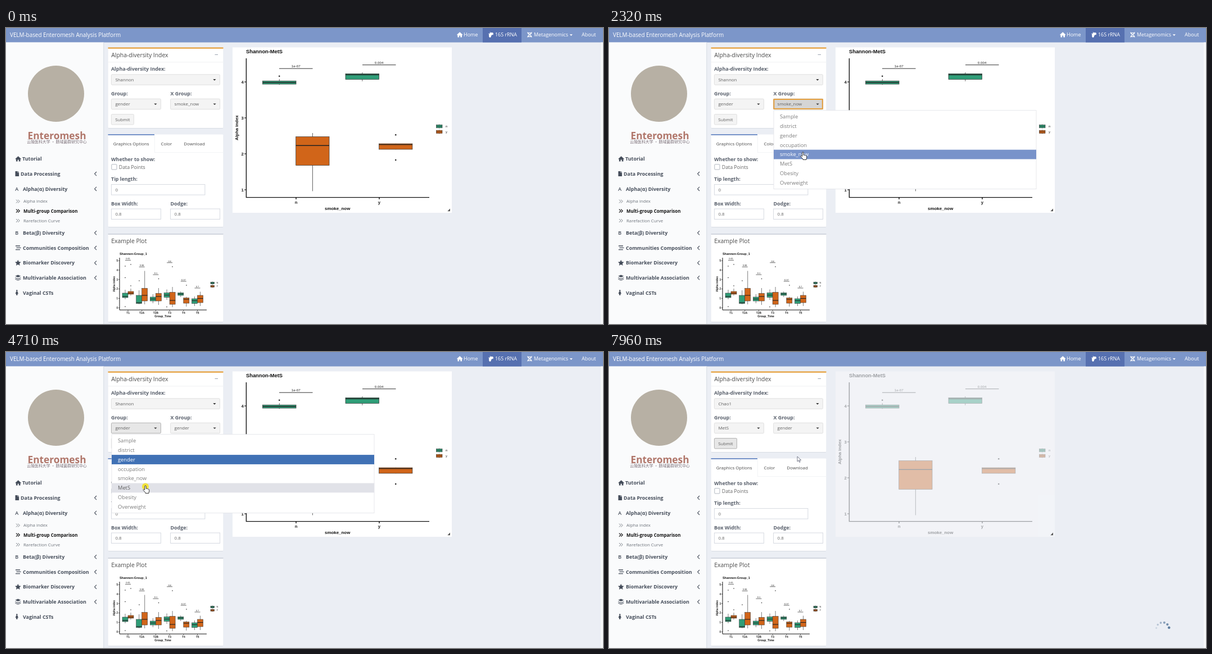
Recreate the animation shown at these times as an HTML page. Size 1062 by 527 pixels, loop 8000 ms.

```html
<!DOCTYPE html>
<html lang="en">
<head>
<meta charset="utf-8">
<title>Alpha diversity</title>
<style>
html, body { margin: 0; width: 100%; height: 100%; overflow: hidden; background: #ebeef4; }
svg { display: block; width: 1062px; height: 527px; }
text { font-family: "Open Sans", sans-serif; white-space: pre; }
.plot text { font-family: "Liberation Sans", Arial, sans-serif; }
.cjk { font-family: "Noto Sans CJK SC", "Noto Sans CJK", sans-serif; }
</style>
</head>
<body>
<svg id="stage" viewBox="0 0 1062 527" xmlns="http://www.w3.org/2000/svg"></svg>
<script>
const LOOP = 8000;
const GREEN = '#2f9d77', ORANGE = '#d16519', INK = '#454d5a', SOFT = '#666';
const stage = document.getElementById('stage');
const out = [];
const put = s => out.push(s);

const rect = (x, y, w, h, fill, extra = '') =>
  `<rect x="${x}" y="${y}" width="${w}" height="${h}" fill="${fill}" ${extra}/>`;
const path = (d, fill, extra = '') => `<path d="${d}" fill="${fill}" ${extra}/>`;
const line = (d, color, w = 1) => path(d, 'none', `stroke="${color}" stroke-width="${w}"`);
const dot = (x, y, r, fill = '#222') => `<circle cx="${x}" cy="${y}" r="${r}" fill="${fill}"/>`;
const text = (x, y, s, size, fill = SOFT, extra = '') =>
  `<text x="${x}" y="${y}" font-size="${size}" fill="${fill}" ${extra}>${s}</text>`;
const BOLD = 'font-weight="700"', MID = 'text-anchor="middle"', END = 'text-anchor="end"';
const at = (x, y, d, fill, extra = '') => path(d, fill, `transform="translate(${x} ${y})" ${extra}`);

const HOME = 'M0 5L5.2 .3 10.4 5l-.7.8L9 5.2V9.5H6.3V6.4H4.1v3.1H1.4V5.2l-.7.6z';
const CARET = 'M-2.6-1.2h5.2L0 1.5z';

// Top bar
function navbar() {
  put(rect(0, 0, 1062, 25.6, '#7c96c9'));
  put(rect(848, 0, 69, 25.6, '#5670b0'));
  put(text(7, 15.8, 'VELM-based Enteromesh Analysis Platform', 9.9, '#fff'));
  put(at(802, 7, HOME, '#fff'));
  put(text(814, 15.2, 'Home', 9, '#fff'));
  put(at(858, 7.5, 'M1 6Q1 1 6 .6q3 0 3 2.2 0 1.6-2 2Q5 5 5 7.2 4.6 9.6 2.6 9.4 1 9 1 6z', '#fff'));
  put(line('M858 10l2 1M861 7l1 2M867 12l-2-1', '#fff', .8));
  put(text(870, 15.2, '16S rRNA', 8.95, '#fff'));
  put(line('M928 7.5c0 5 7 4 7 9M935 7.5c0 5-7 4-7 9M928 8.8h7M928 15.4h7', '#fff', 1.3));
  put(text(939, 15.2, 'Metagenomics', 8.95, '#fff'));
  put(at(1005.3, 12.5, CARET, '#fff'));
  put(text(1024, 15.2, 'About', 9, '#fff'));
}

function sidebar() {
  put(rect(172, 25.6, 2.5, 502, '#dfe3ea'));
  put(rect(0, 25.6, 173, 502, '#fafbfc'));
  put(rect(1058, 25.6, 4, 502, '#f6f7f9'));
  put(dot(89, 117, 50, '#b7b0a4'));
  put(text(90.5, 198, 'Enteromesh', 17.3, '#b0766a', BOLD + ' ' + MID));
  put(text(90.5, 204.8, '云陵医科大学 · 肠域菌群研究中心', 6.9, '#7b6f78', MID + ' class="cjk"'));

  const items = [
    [29, 236.2, 'Tutorial', 0], [26, 262.8, 'Data Processing', 1], [30, 289.6, 'Alpha(α) Diversity', 1],
    [30, 368, 'Beta(β) Diversity', 1], [30, 394.8, 'Communities Composition', 1],
    [30, 421.4, 'Biomarker Discovery', 1], [30, 448, 'Multivariable Association', 1], [30, 474.6, 'Vaginal CSTs', 0]
  ];
  for (const [x, y, s, chevron] of items) {
    put(text(x, y, s, 8.9, INK, BOLD));
    if (chevron) put(line(`M161 ${y - 6.8}l-3.4 3.6 3.4 3.6`, INK, 1.1));
  }
  put(at(16.5, 228, HOME, INK));
  put(at(16.5, 255, 'M0 0h4v2.6h2.6V9H0z M4.6 0l2 2h-2z', INK));
  put(text(16.3, 289.6, 'A', 9, INK, 'font-weight="600"'));
  put(text(16.3, 368, 'B', 9, INK, 'font-weight="600"'));
  put(line('M17 388h8M18.5 391.3h8M17 394.6h8', INK, 1.3));
  put(at(21.3, 418, 'M0-5.2l1.6 3.4 3.7.5-2.7 2.5.7 3.7L0 3.1l-3.3 1.8.7-3.7-2.7-2.5 3.7-.5z', INK));
  put(at(21.3, 444.5, 'M0-5l5 2.2L0-.6-5-2.8zM-5-.4L0 1.8 5-.4v1L0 3-5 .6zM-5 2L0 4.2 5 2v1L0 5.3-5 3z', INK));
  put(dot(19.3, 467.6, 1.3, INK));
  put(at(19.3, 469.2, 'M-1.3 0h2.6l1.3 4H1.2v2.5h-2.4V4h-1.4z', INK));

  const subs = [[311.4, 'Alpha index'], [328.5, 'Multi-group Comparison'], [345.8, 'Rarefaction Curve']];
  subs.forEach(([y, s], i) => {
    const on = i === 1, c = on ? '#111' : '#6d737b';
    put(line(`M18 ${y - 5.8}l3 3-3 3M21.3 ${y - 5.8}l3 3-3 3`, c, on ? 1.2 : .9));
    put(text(31, y, s, on ? 7.95 : 7.85, c, on ? BOLD : ''));
  });
}

function panel(y, h) {
  put(rect(181.5, y + 1, 205, h, '#d8dce3', 'rx="2"'));
  put(rect(181.5, y, 205, h, '#fff', 'rx="1.5"'));
}
const label = (x, y, s) => put(text(x, y, s, 8.9, '#59606c', BOLD));
function input(x, y, w, value) {
  put(rect(x, y, w, 18.5, '#fff', 'stroke="#d2d6de" stroke-width=".9"'));
  put(text(x + 7, y + 12.4, value, 8, SOFT));
}
function select(id, x, y, w) {
  put(`<g id="${id}">` +
    rect(x, y, w, 18.5, '#f4f4f4', 'class="face" rx="1.5" stroke="#ddd" stroke-width=".9"') +
    rect(x + .8, y + .8, w - 1.6, 16.9, 'none', 'class="ring" stroke="#e6a140" stroke-width="2"') +
    text(x + 7, y + 12, '', 7.95, '#5f5f5f') + at(x + w - 9.5, y + 9.4, CARET, '#333') + '</g>');
}

function forms() {
  panel(35, 143);
  put(rect(181.5, 34.6, 205, 2.1, '#e49a2f'));
  put(line('M182 60.8H386', '#f0f1f3'));
  put(text(187.3, 51.6, 'Alpha-diversity Index', 10.4, '#4a4a4a'));
  put(line('M371.5 47.4h5.5', '#8c94a3', .9));
  label(187, 76.4, 'Alpha-diversity Index:');
  label(187, 120, 'Group:');
  label(292.5, 120, 'X Group:');
  select('index', 187.4, 82.8, 193);
  select('group', 187.4, 126.2, 88);
  select('xgroup', 292.6, 126.2, 88);
  put('<g id="submit">' + rect(187.4, 153.6, 40, 18.4, '#f4f4f4', 'class="face" rx="1.5" stroke="#ddd" stroke-width=".9"') +
    text(207.4, 165.6, 'Submit', 7.95, '#5f5f5f', MID) + '</g>');

  panel(189.5, 164.5);
  put(line('M264 221.6H386.5', '#f2f3f5'));
  put(rect(181.5, 189, 82.5, 2, '#7592c9'));
  put(line('M264.3 191V221.6', '#f2f3f5'));
  put(text(190.7, 209.4, 'Graphics Options', 7.95, '#4a4a4a'));
  put(text(275.5, 209.4, 'Color', 7.95, '#4a4a4a'));
  put(text(316.3, 209.4, 'Download', 7.95, '#4a4a4a'));
  label(187, 237.2, 'Whether to show:');
  put(rect(187.8, 242.8, 9.2, 9.2, '#fff', 'rx="1" stroke="#aab0ba" stroke-width=".9"'));
  put(text(200.8, 250.6, 'Data Points', 8.75));
  label(187, 272.2, 'Tip length:');
  input(187.4, 278.6, 166.5, '0');
  label(187, 315.6, 'Box Width:');
  label(292.5, 315.6, 'Dodge:');
  input(187.4, 322, 88, '0.8');
  input(292.6, 322, 88, '0.8');

  panel(366.5, 156.5);
  put(rect(181.5, 366, 205, 2, '#d2d6de'));
  put(text(187.3, 383, 'Example Plot', 10.4, '#4a4a4a'));
}

// Box from whisker top, upper quartile, median, lower quartile, whisker bottom
function box(x, w, [hi, q3, med, q1, lo], fill, k) {
  const m = x + w / 2;
  return line(`M${m} ${hi}V${lo}`, '#333', .8 * k) +
    rect(x, q3, w, q1 - q3, fill, `stroke="#333" stroke-width="${.7 * k}"`) +
    line(`M${x} ${med}h${w}`, '#222', 1.4 * k);
}
function legend(x, y, w, h, gap, names, size) {
  return names.map((n, i) => {
    const t = y + i * gap;
    return line(`M${x + w / 2} ${t - 1}v${h + 2}`, '#333', .6) +
      rect(x, t, w, h, i ? ORANGE : GREEN, 'stroke="#333" stroke-width=".6"') +
      line(`M${x} ${t + h / 2}h${w}`, '#222', .8) + text(x + w + size, t + h / 2 + size * .35, n, size, '#222');
  }).join('');
}
const upright = (x, y, s, size) =>
  text(0, 0, s, size, '#111', `${BOLD} ${MID} transform="translate(${x} ${y}) rotate(-90)"`);

function mainPlot() {
  put('<g id="plot" class="plot">' + rect(403, 34.5, 390, 294.5, '#fff'));
  put(text(427, 45, 'Shannon-MetS', 9.3, '#111', BOLD));
  for (let v = 1; v < 5; v++) {
    const y = 352 - 64 * v;
    put(line(`M424 ${y}h3.5`, '#111', 1.1) + text(422.8, y + 2.8, v, 7.7, '#222', BOLD + ' ' + END));
  }
  put(line('M427.4 54V301.6H753M516 301.6v3.4M664 301.6v3.4', '#111', 1.4));
  put(text(516, 312.6, 'n', 7.7, '#222', BOLD + ' ' + MID) + text(664, 312.6, 'y', 7.7, '#222', BOLD + ' ' + MID));
  put(text(589.7, 323.6, 'smoke_now', 7.9, '#111', BOLD + ' ' + MID) + upright(412.8, 177.7, 'Alpha index', 7.9));
  put(line('M486 72.2h59.5M634 65.7h59.5', '#333', 1));
  put(text(515.7, 70, '1e-07', 6.2, '#222', MID) + text(663.6, 63.5, '0.004', 6.2, '#222', MID));
  put(box(456.5, 59.5, [91, 94.2, 97, 100, 101.2], GREEN, 1) + box(604, 59.5, [79, 81.5, 83.2, 91.4, 94.8], GREEN, 1));
  put(box(515.7, 59.3, [187, 193.6, 209.2, 244.5, 290.5], ORANGE, 1) + box(663.6, 59.3, [205.8, 206, 207.6, 216, 216.2], ORANGE, 1));
  put(dot(486.2, 85.8, 1.3) + dot(693.2, 190.3, 1.3) + dot(693.2, 235, 1.3));
  put(legend(765.5, 172.4, 10.5, 5.4, 9.8, ['n', 'y'], 6));
  put('</g>' + path('M790 321.5v4.7h-4.7z', '#555'));
}

function examplePlot() {
  const groups = [
    ['T1', 413.6, '0.65', [466, 472, 478, 480, 483], [464, 469, 472, 474, 476.5]],
    ['T2A', 425.4, '0.88', [467, 476, 489, 490.5, 492], [432.5, 463.5, 476, 486, 492]],
    ['T2B', 439.2, '0.1', [474, 479, 482.5, 486, 490], [463, 472.5, 478, 486, 493]],
    ['T3', 417.8, '0.8', [465.5, 471.5, 475.5, 479.5, 484], [461, 470.5, 485, 492, 497]],
    ['T4', 451, '0.37', [469, 471.5, 473.5, 476, 479], [478.5, 480.5, 483, 490, 496]],
    ['T5', 463, '0.7', [478, 482, 485.5, 490.5, 495], [469.5, 476, 481.5, 489, 495]]
  ];
  const strays = [[212, 424], [212, 444.5], [212, 496], [222, 421], [222, 459], [237, 450], [271.5, 446.5],
    [286, 496.5], [296, 425], [321, 458]];
  put('<g class="plot">' + text(202, 403.8, 'Shannon-Group_1', 5.6, '#111', BOLD));
  for (let v = 0; v < 6; v++) {
    const y = 498.2 - 16.8 * v;
    put(line(`M200 ${y}h2`, '#111', .7) + text(199, y + 1.7, v, 4.6, '#222', BOLD + ' ' + END));
  }
  put(line('M202 409V502H357', '#111', 1));
  groups.forEach(([name, y, p, a, b], i) => {
    const x = 217 + 24.7 * i;
    put(line(`M${x} 502v2`, '#111', .7) + text(x, 508.6, name, 4.9, '#222', BOLD + ' ' + MID));
    put(line(`M${x - 5} ${y}h10`, '#333', .7) + text(x, y - 1.2, p, 3.9, '#222', MID));
    put(box(x - 10, 10, a, GREEN, .8) + box(x, 10, b, ORANGE, .8));
  });
  strays.forEach(([x, y]) => put(dot(x, y, .8)));
  put(text(279, 515.4, 'Group_Time', 5, '#111', BOLD + ' ' + MID) + upright(193.6, 456, 'Alpha index', 4.9));
  put(legend(364, 452.4, 6.5, 3.2, 5.8, ['N', 'Y'], 4) + '</g>');
}

const ROW = 16.8;
const FIELDS = ['Sample', 'district', 'gender', 'occupation', 'smoke_now', 'MetS', 'Obesity', 'Overweight'];
const INDICES = ['Observed', 'Chao1', 'ACE', 'Shannon', 'Simpson', 'Fisher'];
const menus = [
  { id: 'xgroup', x: 293, y: 146.7, items: FIELDS, chosen: 4, open: 1400, close: 2800 },
  { id: 'group', x: 188, y: 146.7, items: FIELDS, chosen: 2, open: 3545, close: 4770 },
  { id: 'index', x: 188, y: 103.4, items: INDICES, chosen: 3, open: 5505, close: 6500 }
];
function menu({ id, x, y, items }) {
  put(`<g id="${id}-menu">` + rect(x, y, 467, items.length * ROW + 5.6, '#fff', 'stroke="#e0e2e6" stroke-width=".8"'));
  items.forEach((s, i) => {
    const top = y + 2.8 + i * ROW;
    put(`<g>${rect(x, top, 467, ROW, 'none')}${text(x + 11, top + 11.7, s, 9.3, '#7c7c7c')}</g>`);
  });
  put('</g>');
}

navbar(); sidebar(); forms(); mainPlot(); examplePlot();
menus.forEach(menu);
put('<g id="spinner">');
for (let i = 0; i < 6; i++) {
  const a = (-172 + 32 * i) * Math.PI / 180;
  put(`<circle cx="${11.5 * Math.cos(a)}" cy="${11.5 * Math.sin(a)}" r="${1.6 + .14 * i}" fill="#4f7196" opacity="${.2 + .14 * i}"/>`);
}
put('</g>' + '<circle id="press" r="6" fill="#f4e21c" opacity=".85"/><g id="cursor">');
put(path('M-1.2 1.2a1.2 1.2 0 0 1 2.4 0v4l1 .1q1.2-.2 1.4.5 1.3-.3 1.6.5 1.5-.2 1.5 1.4v2.3q0 1-.7 2v1.5h-6v-1.3L-3.6 8.4q-.9-1.3.2-1.8t2.2 1z',
  '#fff', 'id="hand" stroke="#222" stroke-width=".9" stroke-linejoin="round"'));
put(path('M0 0v9l2.2-2 1.5 3.4 1.5-.7-1.5-3.3h3z', '#fff', 'id="arrow" stroke="#55586e" stroke-width=".8"') + '</g>');
stage.innerHTML = out.join('');

const $ = id => document.getElementById(id);
const show = (el, on) => el.setAttribute('visibility', on ? 'visible' : 'hidden');
const within = (t, a, b) => t >= a && t < b;

// Pointer tip: time, x, y
const MOVES = [
  [70, 980, 505], [830, 268, 137], [900, 269, 137], [1250, 338, 137], [1650, 338, 138], [1720, 339, 141],
  [1850, 340, 168], [2060, 344, 249], [2200, 344, 249], [2320, 345, 221], [2530, 346, 191], [2800, 346, 191],
  [3400, 244, 137], [4160, 244, 137], [4490, 248, 238], [4800, 248, 238], [5400, 262, 93], [5950, 262, 93],
  [6330, 265, 131], [6620, 265, 131], [6940, 211, 158], [7180, 211, 158], [7830, 318, 190], [7960, 335, 186]
];
const CLICKS = [[1300, 1400], [2730, 2830], [3430, 3530], [4710, 4800], [5420, 5500], [6465, 6522], [7090, 7190]];
const RINGS = {
  xgroup: [[1350, 3430]],
  group: [[3430, 4700], [4770, 5420]],
  index: [[5420, 6460], [6500, 7090]]
};
const HIT = { index: [187, 83, 381, 102], group: [187, 126, 276, 145], xgroup: [292, 126, 381, 145], submit: [187, 153, 228, 172] };

function tip(t) {
  let i = MOVES.findIndex(m => m[0] > t);
  if (i < 0) return MOVES[MOVES.length - 1].slice(1);
  if (i === 0) i = 1;
  const [t0, x0, y0] = MOVES[i - 1], [t1, x1, y1] = MOVES[i];
  const u = Math.max(0, (t - t0) / (t1 - t0)), e = u * u * (3 - 2 * u);
  return [x0 + (x1 - x0) * e, y0 + (y1 - y0) * e];
}

function drawMenu(m, t, y) {
  const el = $(m.id + '-menu'), open = within(t, m.open, m.close);
  el.style.display = open ? '' : 'none';
  if (!open) return;
  const hover = Math.floor((y - m.y - 2.8) / ROW);
  el.querySelectorAll('g').forEach((row, i) => {
    const on = i === m.chosen, over = i === hover;
    row.firstChild.setAttribute('fill', on ? (over ? '#7893ca' : '#4071b5') : over ? '#e1e2e8' : 'none');
    row.lastChild.setAttribute('fill', on ? '#fff' : over ? '#5c5c5c' : '#7c7c7c');
  });
}

function draw(t) {
  const [x, y] = tip(t), late = tip(t - 40)[1];
  const opened = menus.find(m => within(t, m.open, m.close));
  const inMenu = opened && y >= opened.y;
  const over = inMenu || t < 70 ? null :
    Object.keys(HIT).find(k => x >= HIT[k][0] && y >= HIT[k][1] && x < HIT[k][2] && y < HIT[k][3]);

  const values = {
    index: t < 6500 ? 'Shannon' : 'Chao1',
    group: t < 4770 ? 'gender' : 'MetS',
    xgroup: t < 2800 ? 'smoke_now' : 'gender'
  };
  for (const id in HIT) {
    const el = $(id), face = el.querySelector('.face');
    const ring = (RINGS[id] || []).some(r => within(t, ...r));
    const isOpen = opened && opened.id === id;
    const lit = over === id || isOpen || ring || (id === 'submit' && t >= 7090);
    face.setAttribute('fill', isOpen && ring ? '#d5d5d5' : lit ? '#e7e7e7' : '#f4f4f4');
    face.setAttribute('stroke', lit ? '#a9a9a9' : '#ddd');
    if (values[id]) {
      el.querySelector('text').textContent = values[id];
      show(el.querySelector('.ring'), ring);
    }
  }
  menus.forEach(m => drawMenu(m, t, late));

  const fade = Math.min(1, Math.max(0, (t - 7640) / 310));
  $('plot').setAttribute('opacity', 1 - .65 * fade * (2 - fade));
  show($('spinner'), t >= 7230);
  $('spinner').setAttribute('transform', `translate(985 493) rotate(${(t - 7960) * .36})`);

  const press = $('press');
  show(press, CLICKS.some(c => within(t, ...c)));
  press.setAttribute('cx', x);
  press.setAttribute('cy', y + 1.5);
  show($('hand'), t >= 70 && (inMenu || over));
  show($('arrow'), t >= 70 && !(inMenu || over));
  $('cursor').setAttribute('transform', `translate(${x} ${y})`);
}

const start = performance.now();
function tick() {
  draw((performance.now() - start) % LOOP);
  requestAnimationFrame(tick);
}
draw(0);
requestAnimationFrame(tick);
</script>
</body>
</html>
```
